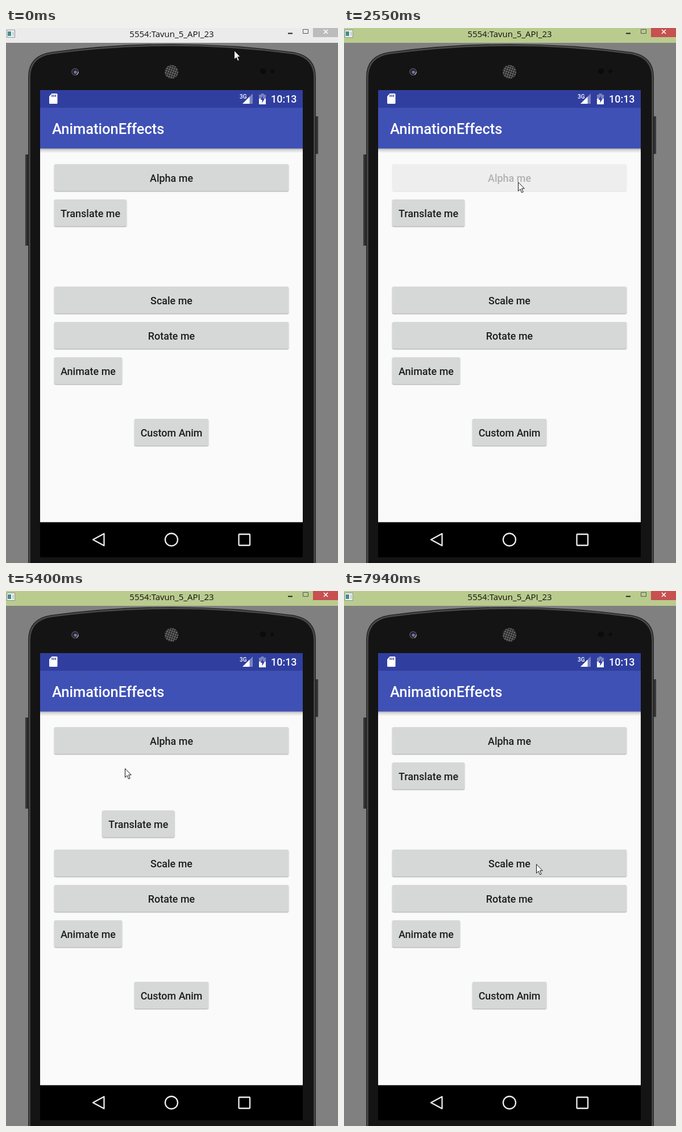
An HTML page that plays this animation: 584x939 px, repeating every 8000 ms.

```html
<!DOCTYPE html>
<html lang="en">
<head>
<meta charset="utf-8">
<title>Animation effects</title>
<style>
  html, body { margin: 0; width: 100%; height: 100%; overflow: hidden; background: #808080; }
  #stage { position: relative; width: 584px; height: 939px; overflow: hidden; }
  svg { position: absolute; left: 0; top: 0; }
  text { font-family: Roboto, sans-serif; font-weight: 500; fill: #fff; }
  .caption { font: 400 15px "Open Sans", sans-serif; fill: #111; }
  .btn {
    position: absolute; height: 47px; border-radius: 2.5px; background: #d6d7d7;
    box-shadow: 0 1px 2px rgba(0,0,0,.36);
    color: #1d1d1d; text-align: center; white-space: nowrap;
    font: 500 17.97px/49px Roboto, sans-serif;
  }
  .btn.pressed { background: #d2d4d4; box-shadow: 0 3px 6px rgba(0,0,0,.32); }
</style>
</head>
<body>
<div id="stage">
  <svg width="584" height="939">
    <defs>
      <linearGradient id="drop" x1="0" y1="0" x2="0" y2="1">
        <stop offset="0" stop-color="#000" stop-opacity=".32"/>
        <stop offset=".4" stop-color="#000" stop-opacity=".13"/>
        <stop offset="1" stop-color="#000" stop-opacity="0"/>
      </linearGradient>
      <pattern id="mesh" width="4" height="4" patternUnits="userSpaceOnUse" patternTransform="rotate(20 291 77)">
        <rect width="4" height="4" fill="#202020"/>
        <circle cx="2" cy="2" r="1.5" fill="#777"/>
      </pattern>
    </defs>

    <!-- window caption -->
    <rect id="bar" width="584" height="26"/>
    <rect x="1.5" y="3.5" width="14" height="13" fill="#f6f6f6" stroke="#8c9296"/>
    <rect x="3" y="6" width="6" height="8" fill="#3f8f8b"/>
    <rect x="11" y="6" width="3" height="8" fill="#c9d0d3"/>
    <text class="caption" x="291.5" y="16" text-anchor="middle">5554:Tavun_5_API_23</text>
    <path d="M496 9.5h8" stroke="#222" stroke-width="2"/>
    <path d="M522.5 2.5h9v7h-9z" fill="none" stroke="#555"/>
    <rect id="close" x="540" width="44" height="16"/>
    <path d="M559 3l7 7M566 3l-7 7" stroke="#fff" stroke-width="1.6"/>

    <!-- phone body -->
    <rect x="34" y="222" width="6" height="160" fill="#2b2b2b"/>
    <rect x="543" y="155" width="6" height="66" fill="#2b2b2b"/>
    <path d="M35.5 222v160M547.5 155v66" stroke="#454545"/>
    <path d="M39 945V86Q39 48 80 42A1612 1612 0 0 1 504 42Q545 48 545 86V945Z" fill="#222"/>
    <path d="M41.5 945V87Q41.500 50 81 44.500A1612 1612 0 0 1 503 44.500Q542.500 50 542.500 87V945Z" fill="#141414" stroke="#4a4a4a" stroke-width="2.500"/>

    <circle cx="121.5" cy="77" r="6.500" fill="#4f4f56"/>
    <circle cx="121.5" cy="77" r="4.800" fill="#1a1a28"/>
    <circle cx="122" cy="77.500" r="2.800" fill="#73739c"/>
    <path d="M124 82a5.500 5.500 0 0 0 3-5" fill="none" stroke="#b4b4bc" stroke-width="1.300"/>
    <circle cx="291" cy="77" r="12" fill="url(#mesh)"/>
    <circle cx="452" cy="76" r="5" fill="#0b0b0b"/>
    <circle cx="468.5" cy="76" r="3" fill="#0b0b0b"/>

    <!-- screen -->
    <rect x="60" y="109" width="462" height="820" fill="#fafafa"/>
    <rect x="60" y="211" width="462" height="8.500" fill="url(#drop)"/>
    <rect x="60" y="109" width="462" height="31" fill="#303f9f"/>
    <rect x="60" y="140" width="462" height="71.500" fill="#3f51b5"/>
    <rect x="60" y="867.4" width="462" height="61.600"/>

    <path d="M80.500 115h8.500q1.500 0 1.500 1.500v15q0 1.500-1.500 1.500H77.500q-1.500 0-1.500-1.500V120z" fill="#fff"/>
    <path d="M81.200 117v4M84.200 117v4M87.200 117v4" stroke="#303f9f" stroke-width="1.500"/>
    <path d="M434 115v18h-18z" fill="#fff" fill-opacity=".35"/>
    <path d="M428.500 120.500V133H416z" fill="#fff"/>
    <text x="411" y="123.500" font-size="10">3G</text>
    <path d="M448.500 115h5v2h3.500v8h-12v-8h3.500z" fill="#fff" fill-opacity=".35"/>
    <path d="M445 124h12v10h-12z" fill="#fff"/>
    <path d="M452 119l-4.500 7h3v5.500l4.500-7.500h-3z" fill="#303f9f"/>
    <text x="466" y="131" font-size="17.970">10:13</text>
    <text x="81" y="185.500" font-size="25.500">AnimationEffects</text>

    <g fill="none" stroke="#ededed" stroke-width="2.300" stroke-linejoin="round">
      <path d="M153 898L172.500 887.500V908.500Z"/>
      <circle cx="291" cy="898" r="11"/>
      <rect x="409.500" y="888.500" width="19.500" height="19.500" rx="1"/>
    </g>
  </svg>

  <svg id="cursor" width="16" height="24">
    <path d="M.5 .7V16.200L4.100 12.800L6.700 18.800L9.200 17.700L6.600 11.800H11.300Z" fill="#fff" stroke="#111"/>
  </svg>
</div>
<script>
  const LOOP = 8000;
  const STEP = 129;
  const $ = id => document.getElementById(id);
  const cursor = $('cursor');

  const row = i => 239 + 61.55 * i;
  const addButton = (label, left, top, width) => {
    const b = document.createElement('div');
    b.className = 'btn';
    b.textContent = label;
    b.style.cssText = `left:${left}px;top:${top}px;width:${width}px`;
    $('stage').insertBefore(b, cursor);
    return b;
  };
  const alpha = addButton('Alpha me', 85, row(0), 412);
  const translate = addButton('Translate me', 85, row(1), 127);
  const scale = addButton('Scale me', 85, row(3.5), 412);
  addButton('Rotate me', 85, row(4.5), 412);
  addButton('Animate me', 85, row(5.5), 119);
  addButton('Custom Anim', 226, 686, 130);

  const bursts = [0, 1040, 1950, 4450, 5950, 6890];
  const held = time => {
    const start = bursts.findLast(b => b <= time);
    return start + Math.floor((time - start) / STEP) * STEP;
  };

  // Pointer strokes: each glides from where the last one ended.
  const home = { x: 401, y: 39 };
  const strokes = [
    { from: 0, to: 390, x: 399, y: 55 },
    { from: 980, to: 1160, x: 446, y: 458 },
    { from: 1180, to: 1550, x: 306, y: 270 },
    { from: 3050, to: 3620, x: 183, y: 325 },
    { from: 5080, to: 5600, x: 232, y: 299 },
    { from: 5850, to: 6460, x: 338, y: 479 }
  ];

  const clamp = p => Math.min(1, Math.max(0, p));
  const ease = p => (1 - Math.cos(Math.PI * p)) / 2;

  const pointer = t => strokes.reduce((pos, s) => {
    const p = ease(clamp((t - s.from) / (s.to - s.from)));
    return { x: pos.x + (s.x - pos.x) * p, y: pos.y + (s.y - pos.y) * p };
  }, home);

  // One-second button effect; null while the button is at rest.
  const progress = (t, start) => {
    const p = (t - start) / 1000;
    return p < 0 || p > 1 ? null : ease(p);
  };
  const press = (button, t, from) => button.classList.toggle('pressed', t >= from && t < from + STEP);

  function draw(now) {
    const t = held(now % LOOP);

    const active = t >= 1950;
    $('bar').setAttribute('fill', active ? '#bacb8e' : '#ebebeb');
    $('close').setAttribute('fill', active ? '#c75050' : '#bcbcbc');

    const { x, y } = pointer(t);
    cursor.style.transform = `translate(${Math.round(x)}px, ${Math.round(y)}px)`;

    press(alpha, t, 2070);
    press(translate, t, 4450);
    press(scale, t, 6890);

    alpha.style.opacity = progress(t, 2080) ?? 1;
    const shift = 85 * (progress(t, 4410) ?? 0);
    translate.style.transform = `translate(${shift}px, ${shift}px)`;
    scale.style.transform = `scale(${progress(t, 6891) ?? 1})`;
  }

  const begin = performance.now();
  const loop = () => {
    draw(performance.now() - begin);
    requestAnimationFrame(loop);
  };
  loop();
</script>
</body>
</html>
```
